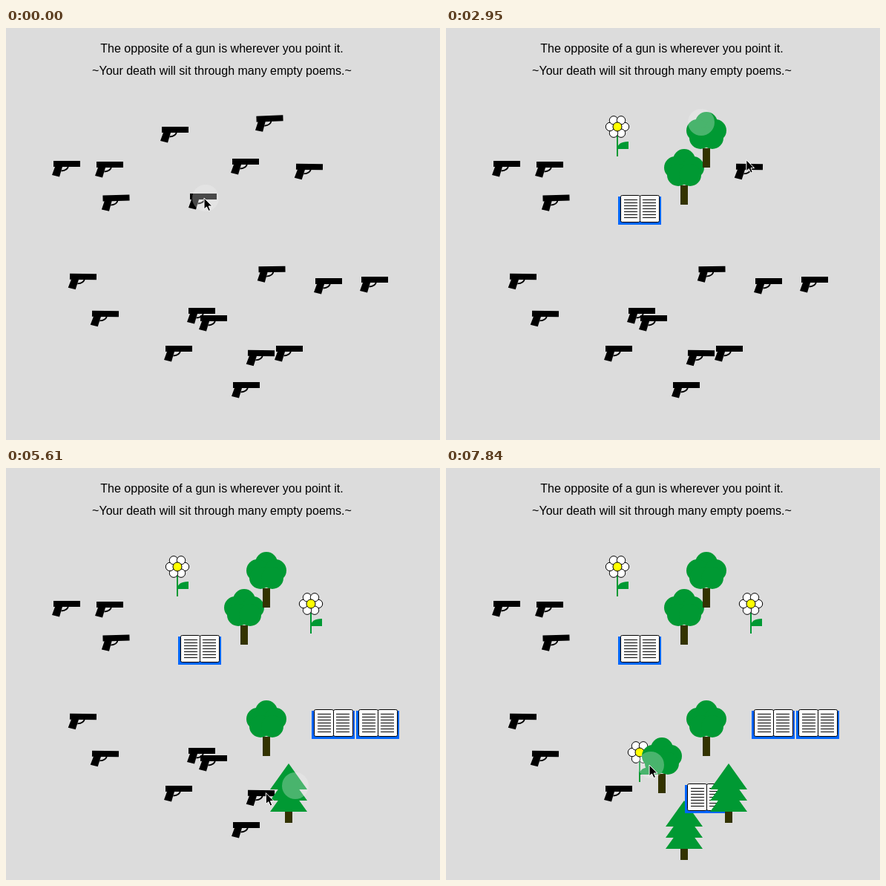
An HTML page that plays this animation: 585 by 555 pixels, repeating every 7990 ms.

```html
<!DOCTYPE html>
<html>
<head>
<meta charset="utf-8">
<style>
  html, body { margin: 0; width: 100%; height: 100%; overflow: hidden; background: #dcdcdc; }
  svg { display: block; }
  text { font: 16px "Liberation Sans", Arial, sans-serif; text-anchor: middle; }
</style>
</head>
<body>
<svg width="585" height="555" viewBox="0 0 585 555">
  <defs>
    <!-- gun: origin at the top left of the slide; the others: bottom centre of a grid cell -->
    <g id="gun">
      <path d="M0 0H36V8H12L8 21.5L-2 19L2 8H0Z"/>
      <path d="M20 7Q19 13 10.5 13.5" fill="none" stroke="#000" stroke-width="1.8"/>
    </g>
    <g id="tree" fill="#093">
      <circle cy="-60" r="15"/>
      <circle cx="-12" cy="-50" r="15"/><circle cx="12" cy="-50" r="15"/>
      <circle cx="-8" cy="-40" r="15"/><circle cx="8" cy="-40" r="15"/>
      <path d="M-5-26H5V0H-5Z" fill="#330"/>
    </g>
    <g id="pine" fill="#093">
      <path d="M0-90L25-55H-25ZM0-75L25-40H-25ZM0-60L25-25H-25Z"/>
      <path d="M-5-25H5V-10H-5Z" fill="#330"/>
    </g>
    <g id="flower">
      <path d="M-1-45H1V-15H-1ZM0-25Q0-35 15-35V-25Z" fill="#093"/>
      <g id="petals" fill="#fff" stroke="#000"></g>
      <circle cy="-55" r="6" fill="#ff0" stroke="#000"/>
    </g>
    <g id="book" stroke="#000">
      <path d="M-29-61H29V-23H-29Z" fill="#06f" stroke="none"/>
      <rect x="-25.5" y="-62.5" width="26" height="36" rx="2" fill="#fff"/>
      <rect x=".5" y="-62.5" width="26" height="36" rx="2" fill="#fff"/>
      <path id="lines"/>
    </g>
  </defs>
  <text x="291" y="33">The opposite of a gun is wherever you point it.</text>
  <text x="291" y="63">~Your death will sit through many empty poems.~</text>
  <g id="scene"></g>
  <circle id="halo" r="18" fill="#f0f0f0" fill-opacity=".3"/>
  <path id="cursor" d="M0 0V15L3.5 12L6 17.5L8.5 16.5L6.2 11H10.8Z" stroke="#fff"/>
</svg>
<script>
const $ = id => document.getElementById(id);
const LOOP = 7990, STEPS = 54, STEP = LOOP / STEPS;

// x, y and tilt of each gun, back to front
const guns = [
  [64, 179], [122, 180], [130.5, 225, -1.5], [210, 133], [305, 176],
  [337.5, 118, -2], [391, 183, 1], [248, 223], [86, 331, 1], [116, 381, 1],
  [246, 377], [262, 387], [340.5, 321, -1], [417, 337], [479, 335],
  [215, 428], [306, 477], [326, 434, 1], [364, 428],
];

// Where the pointer stops, at which step, and what the nearest gun becomes
const stops = [
  [4, 267, 229, 'book'], [9, 230, 143, 'flower'], [14, 308, 171, 'tree'],
  [18, 342, 127, 'tree'], [21, 409, 181, 'flower'], [25, 356, 335, 'tree'],
  [29, 433, 348, 'book'], [33, 497, 348, 'book'], [36, 388, 428, 'pine'],
  [40, 341, 440, 'book'], [45, 313, 491, 'pine'], [50, 282, 398, 'tree'],
  [52, 274, 400, 'flower'],
];

const NS = 'http://www.w3.org/2000/svg';
function add(parent, tag, attrs) {
  const el = document.createElementNS(NS, tag);
  for (const key in attrs) el.setAttribute(key, attrs[key]);
  return parent.appendChild(el);
}
const move = (el, x, y, tilt = 0) =>
  el.setAttribute('transform', `translate(${x} ${y}) rotate(${tilt} 18 4)`);

for (let i = 0; i < 6; i++) {
  const a = i * Math.PI / 3;
  add($('petals'), 'circle', { cx: 10 * Math.cos(a), cy: -55 + 10 * Math.sin(a), r: 5.7 });
}
let d = '';
for (let y = -56.5; y < -31; y += 4) d += `M-21 ${y}H-3M4 ${y}H22`;
$('lines').setAttribute('d', d);

const things = guns.map(([x, y, tilt]) => {
  const el = add($('scene'), 'use', {});
  return { x, y, tilt, el, step: Infinity };
});

for (const [step, px, py, kind] of stops) {
  const dist = g => Math.hypot(g.x + 18 - px, g.y + 10 - py);
  const left = things.filter(g => !g.kind);
  const nearest = left.reduce((a, b) => dist(b) < dist(a) ? b : a);
  Object.assign(nearest, { kind, step });
}

// A new thing snaps to a 30 by 50 grid
const snap = (v, size, origin) => Math.round((v - origin) / size) * size + origin;
function drawThing({ x, y, tilt, el, kind, step }, n) {
  const turned = n >= step;
  el.setAttribute('href', '#' + (turned ? kind : 'gun'));
  if (turned) move(el, snap(x + 18, 30, 21), snap(y + 60, 50, 38));
  else move(el, x, y, tilt);
}

// Rest for one step at each stop, then ease out to the next
function pointer(n) {
  const i = stops.findIndex(s => s[0] > n);
  if (i === 0) return stops[0].slice(1, 3);
  if (i < 0) return stops[stops.length - 1].slice(1, 3);
  const [s0, x0, y0] = stops[i - 1], [s1, x1, y1] = stops[i];
  const u = Math.max(0, (n - s0 - 1) / (s1 - s0 - 1));
  const k = 1 - (1 - u) ** 4;
  return [x0 + (x1 - x0) * k, y0 + (y1 - y0) * k];
}

// Motion goes in steps, and the halo trails the pointer by one
function draw(time) {
  const n = Math.min(STEPS - 1, Math.floor((time % LOOP + 15) / STEP));
  for (const thing of things) drawThing(thing, n);
  const [hx, hy] = pointer(n - 1);
  move($('halo'), hx + 2, hy);
  move($('cursor'), ...pointer(n));
}

const start = performance.now();
function tick() {
  draw(performance.now() - start);
  requestAnimationFrame(tick);
}
tick();
</script>
</body>
</html>
```
